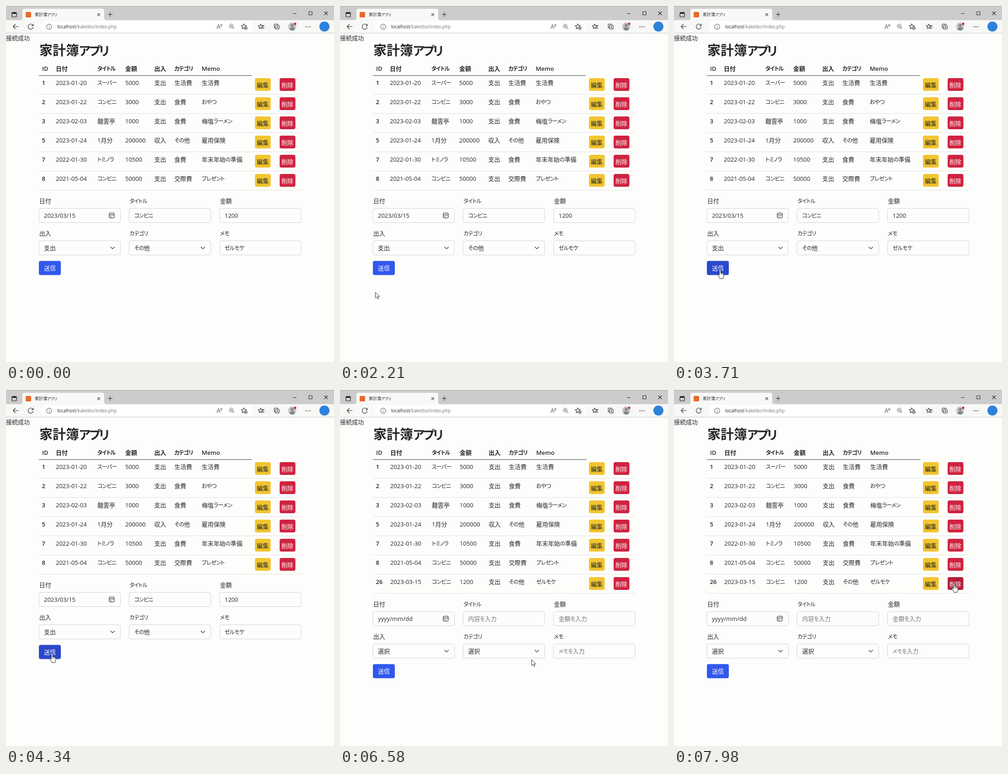
An HTML page for the animation above (8 s loop, 718x780 px).

```html
<!DOCTYPE html>
<html lang="ja">
<head>
<meta charset="utf-8">
<title>家計簿アプリ</title>
<style>
html, body { margin: 0; width: 100%; height: 100%; overflow: hidden; background: #fdfdfb; }
svg { display: block; width: 100%; height: 100%; }
text { font: 13px "Open Sans", "Noto Sans CJK JP", "Noto Sans CJK", sans-serif; fill: #25272b; white-space: pre; }
.k { font-size: .92em; letter-spacing: -.05em; font-feature-settings: "palt", "kern"; }
.b { font-weight: 600; }
.b .k { letter-spacing: -.08em; }
.h1 { font-size: 29px; font-weight: 600; }
.h1 .k { letter-spacing: -.11em; }
.tab { font-size: 9.1px; }
.url { font-size: 9.9px; }
.ph { fill: #74777d; }
.w { fill: #fff; }
.i { fill: none; stroke: #2b2b2d; stroke-width: 1.1; stroke-linecap: round; stroke-linejoin: round; }
.g { stroke: #66686c; }
.field { fill: #fdfdfb; stroke: #cdd2e0; }
</style>
</head>
<body>
<svg id="stage" viewBox="0 0 718 780" xmlns="http://www.w3.org/2000/svg"></svg>
<script>
const LOOP = 8000, RELOAD = 4450, SHOW = 1950, ROW = 42;

const kana = s => s.replace(/[ぁ-んァ-ヶー]+/g, '<tspan class="k">$&</tspan>');
const text = (x, y, s, cls = '') => `<text x="${x}" y="${y}" class="${cls}">${kana(s)}</text>`;
const rect = (x, y, w, h, fill, r = 0, extra = '') =>
  `<rect x="${x}" y="${y}" width="${w}" height="${h}" rx="${r}" fill="${fill}" ${extra}/>`;
const icon = (d, cls = '') => `<path d="${d}" class="i ${cls}"/>`;
const ring = (x, y, r, cls = '') => `<circle cx="${x}" cy="${y}" r="${r}" class="i ${cls}"/>`;

function star(cx, cy, r) {
  const pts = Array.from({ length: 10 }, (_, i) => {
    const a = -Math.PI / 2 + i * Math.PI / 5, q = i % 2 ? r * .48 : r;
    return `${(cx + q * Math.cos(a)).toFixed(1)},${(cy + q * Math.sin(a)).toFixed(1)}`;
  });
  return `<polygon points="${pts.join(' ')}" class="i"/>`;
}

function browser() {
  return rect(0, 0, 718, 31, '#cccccd') + rect(0, 0, 718, 1, '#a9a9ab') +
    rect(0, 31, 718, 28, '#f8f8f7') + rect(0, 59, 718, 1, '#c9c9cb') +
    '<path d="M31 31q5 0 5-5V11q0-5 5-5H210q5 0 5 5V26q0 5 5 5Z" fill="#f8f8f7"/>' +
    rect(13, 14, 10, 10, 'none', 2, 'stroke="#1c1c1e" stroke-width="1.2"') +
    rect(13, 14, 10, 3, '#1c1c1e', 1) +
    rect(43, 13, 12, 12, '#e56a2c', 2) +
    text(63, 22, '家計簿アプリ', 'tab') +
    icon('M200.5 16.5l5 5m0-5l-5 5M223.5 18.5h9m-4.5-4.5v9') +
    icon('M628.5 16.5h7M663 12.5h7v7h-7ZM697 12.5l7 7m0-7l-7 7') +
    icon('M27 45H15.5m5-5l-5 5l5 5') +
    icon('M59.3 43a5.6 5.6 0 1 0 .3 3.3M59.7 39.5v3.7h-3.7') +
    rect(76, 33, 464, 24, '#fff', 12) +
    ring(94.5, 45.5, 5.6, 'g') + icon('M94.5 45v3M94.5 42.7v.1', 'g') +
    '<text x="112" y="49" class="url">localhost<tspan fill="#74767a">/kakeibo/index.php</tspan></text>' +
    icon('M461.5 49.5l3.5-9l3.5 9m-5.8-3h4.6M469.5 40.5q1.5 1.5 0 4M471.5 39.5q2.2 2.7 0 6', 'g') +
    ring(493, 44, 4.2, 'g') + icon('M496 47l3 3M491 44h4m-2-2v4', 'g') +
    star(520.5, 45, 6) +
    '<circle cx="525" cy="48.5" r="3.2" fill="#fff" stroke="#2b2b2d"/>' + icon('M523.7 48.5h2.6m-1.3-1.3v2.6') +
    star(557.5, 45, 5.5) + icon('M561.5 42.5h3.5m-3 3h3m-3.5 3h3.5') +
    rect(587, 39.5, 8, 8, 'none', 2, 'class="i"') +
    rect(589.5, 42, 8.5, 8.5, '#f8f8f7', 2, 'stroke="#2b2b2d" stroke-width="1.1"') +
    icon('M592 46.25h3.5m-1.75-1.75v3.5') +
    '<circle cx="626.5" cy="45" r="9" fill="#c6c6ca"/><circle cx="626.5" cy="42.5" r="3.3" fill="#85868b"/>' +
    '<path d="M620.5 51.5q0-5 6-5t6 5q-6 4.5-12 0Z" fill="#85868b"/><circle cx="633" cy="39" r="2.5" fill="#c8202d"/>' +
    [656.5, 661, 665.5].map(x => `<circle cx="${x}" cy="45.5" r="1.1" fill="#2b2b2d"/>`).join('') +
    '<circle cx="697" cy="45" r="11" fill="#2f7fdb"/>';
}

const COLS = [109, 200, 261, 324.5, 368.5, 428.5];
const HEAD = ['日付', 'タイトル', '金額', '出入', 'カテゴリ', 'Memo'];
const ROWS = [
  ['1', '2023-01-20', 'スーパー', '5000', '支出', '生活費', '生活費'],
  ['2', '2023-01-22', 'コンビニ', '3000', '支出', '食費', 'おやつ'],
  ['3', '2023-02-03', '麺雲亭', '1000', '支出', '食費', '梅塩ラーメン'],
  ['5', '2023-01-24', '1月分', '200000', '収入', 'その他', '雇用保険'],
  ['7', '2022-01-30', 'トミノラ', '10500', '支出', '食費', '年末年始の準備'],
  ['8', '2021-05-04', 'コンビニ', '50000', '支出', '交際費', 'プレゼント'],
  ['26', '2023-03-15', 'コンビニ', '1200', '支出', 'その他', 'ゼルモケ']
];

const cells = (vals, y, cls) => vals.map((s, i) => text(COLS[i], y, s, cls)).join('');

function tableRow([id, ...vals], i) {
  const y = 173 + ROW * i, top = 158 + ROW * i, last = i === ROWS.length - 1;
  return `<g ${last ? 'id="added"' : ''}>` +
    text(78.5, y, id, 'b') + `<g class="cells">${cells(vals, y)}</g>` +
    rect(72, 193 + ROW * i, 574, 1, '#dfe1e5') +
    rect(545, top, 34.5, 28, '#f2c531', 4) + text(549, top + 19.5, '編集') +
    rect(599, top, 34.5, 28, '#cf2340', 4, last ? 'id="del"' : '') + text(603, top + 19.5, '削除', 'w') +
    '</g>';
}

const FX = [72, 269.5, 467.5];
const LABELS = ['日付', 'タイトル', '金額', '出入', 'カテゴリ', 'メモ'];
const FILLED = ['2023/03/15', 'コンビニ', '1200', '支出', 'その他', 'ゼルモケ'];
const EMPTY = ['yyyy/mm/dd', '内容を入力', '金額を入力', '選択', '選択', 'メモを入力'];
const fieldY = i => 443.5 + 71 * Math.floor(i / 3);
const values = (list, hint) => list.map((s, i) =>
  text(FX[i % 3] + 11, fieldY(i) + 20.7, s, hint && [1, 2, 5].includes(i) ? 'ph' : '')).join('');

function form() {
  const boxes = LABELS.map((s, i) => {
    const x = FX[i % 3], y = fieldY(i);
    return text(x + .8, y - 11.5, s) + rect(x, y, 178.5, 31, 'none', 4, 'class="field"');
  }).join('');
  const dots = [0, 1, 2, 3, 4].map(i =>
    `<circle cx="${228.5 + i % 3 * 2.7}" cy="${459.5 + Math.floor(i / 3) * 2.7}" r=".8" fill="#222"/>`).join('');
  return '<g id="form">' + boxes +
    rect(226, 453.5, 11, 11, 'none', 2.5, 'class="i"') + icon('M226 457h11') + dots +
    icon('M229 528l4.2 4.2l4.2-4.2M426.7 528l4.2 4.2l4.2-4.2') +
    `<g id="filled">${values(FILLED)}</g><g id="empty">${values(EMPTY, true)}</g>` +
    rect(72, 558.5, 48, 31, '#3158ee', 4, 'id="send"') + text(83, 579, '送信', 'w') + '</g>';
}

const pointers =
  '<g id="arrow"><path d="M0 0V12.8L3 10.1L5.1 14.8L7.1 13.9L5.1 9.3H9Z" fill="#fff" stroke="#1a1a1a" stroke-width=".9" stroke-linejoin="round"/></g>' +
  '<g id="hand"><path d="M-1.7 11.5V1.3q0-1.5 1.5-1.5t1.5 1.5V6q2.2-.7 2.5.7q2-.6 2.3.8q1.9-.4 1.9 1.6V13q0 2.5-1.5 3.7V18.8H-.8V17L-5 11.5q-1-1.5 .2-2.2q1-.5 2 .7Z" fill="#fff" stroke="#1a1a1a" stroke-width=".95" stroke-linejoin="round"/>' +
  '<path d="M1.3 6v4M3.8 7v3.3M6.1 8v2.6" fill="none" stroke="#1a1a1a" stroke-width=".7"/></g>';

document.getElementById('stage').innerHTML =
  rect(0, 0, 718, 780, '#fdfdfb') + browser() +
  text(0, 75, '接続成功') + text(73, 108, '家計簿アプリ', 'h1') +
  text(79, 142, 'ID', 'b') + `<g class="cells">${cells(HEAD, 142, 'b')}</g>` +
  rect(72, 152, 466, 1, '#3c3e42', 0, 'id="rule"') +
  ROWS.map(tableRow).join('') + form() + pointers;

const $ = id => document.getElementById(id);
const show = (id, on) => $(id).setAttribute('visibility', on ? 'visible' : 'hidden');
const move = (el, x, y) => el.setAttribute('transform', `translate(${x} ${y})`);
const cellGroups = document.querySelectorAll('.cells');

// pointer path: time, x, y
const PATH = [
  [SHOW, 77.5, 627], [2280, 77.5, 627], [2500, 86, 604], [2900, 101, 578.5],
  [5850, 101, 578.5], [6130, 210, 640], [6380, 335, 634], [6580, 419.5, 591],
  [6720, 424, 610], [7040, 448, 709], [7280, 525, 690], [7500, 588, 590],
  [7800, 613.5, 424.5], [LOOP, 613.5, 424.5]
];

function slope(i, k) {
  const a = PATH[i - 1], b = PATH[i], c = PATH[i + 1];
  if (!a || !c) return 0;
  const l = (b[k] - a[k]) / (b[0] - a[0]), r = (c[k] - b[k]) / (c[0] - b[0]);
  return l * r > 0 ? 2 * l * r / (l + r) : 0;
}

function pointerAt(t) {
  let i = 0;
  while (i < PATH.length - 2 && t >= PATH[i + 1][0]) i++;
  const p = PATH[i], q = PATH[i + 1], d = q[0] - p[0];
  const u = Math.max(0, Math.min(1, (t - p[0]) / d)), v = 1 - u;
  return [1, 2].map(k => p[k] * v * v * (1 + 2 * u) + q[k] * u * u * (3 - 2 * u) +
    d * u * v * (v * slope(i, k) - u * slope(i + 1, k)));
}

const inside = (x, y, l, t, w, h) => x >= l && x <= l + w && y >= t && y <= t + h;

function render(t) {
  const done = t >= RELOAD, seen = t >= SHOW;
  const [x, y] = pointerAt(t), dy = done ? ROW : 0;
  const onSend = seen && inside(x, y, 72, 558.5 + dy, 48, 31);
  const onDel = done && inside(x, y, 599, 410, 34.5, 28);
  const resting = done && t <= 5850;
  const hand = onSend || onDel || resting;

  show('added', done);
  show('filled', !done);
  show('empty', done);
  move($('form'), 0, dy);
  cellGroups.forEach(g => move(g, done ? 1 : 0, 0));
  $('rule').setAttribute('width', done ? 467 : 466);
  $('send').setAttribute('fill', onSend ? '#2a48cc' : '#3158ee');
  $('del').setAttribute('fill', onDel ? '#b31f38' : '#cf2340');
  show('arrow', seen && !hand);
  show('hand', seen && hand);
  move($('arrow'), x, y);
  move($('hand'), x, y);
}

function tick() {
  render(performance.now() % LOOP);
  requestAnimationFrame(tick);
}
tick();
</script>
</body>
</html>
```
